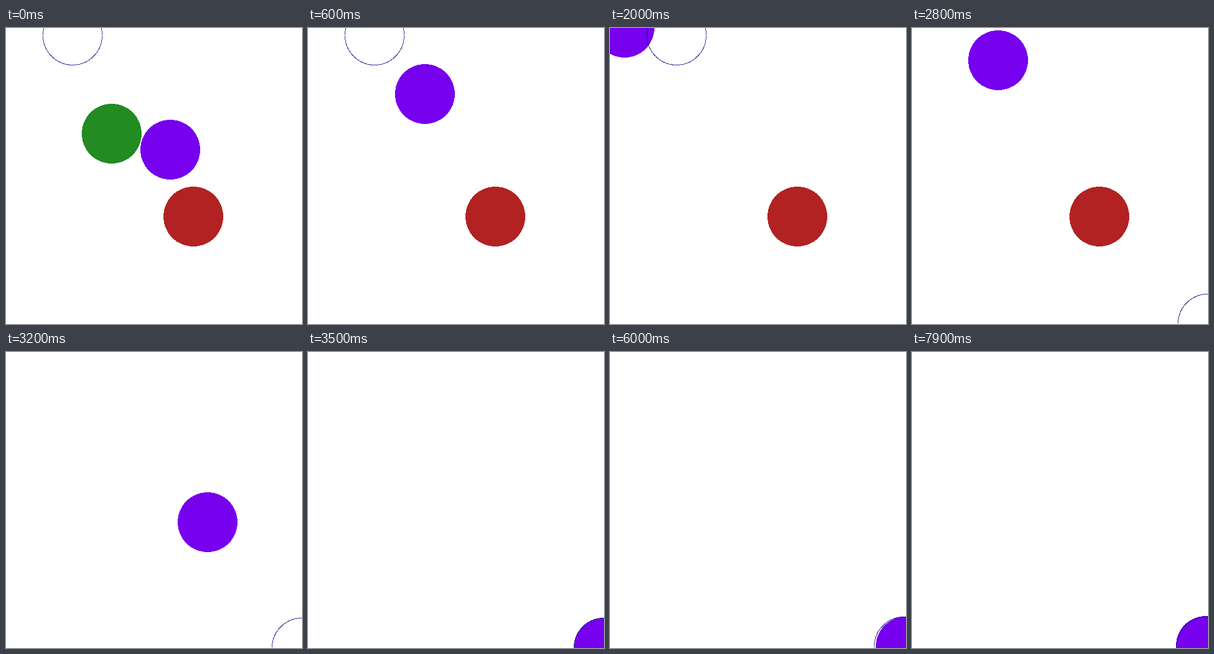
An HTML page for the animation above (8000 ms loop, 500 by 500 pixels).

```html
<!DOCTYPE html>
<html>
<head>
<meta charset="utf-8">
<style>
  html, body { margin: 0; width: 100%; height: 100%; overflow: hidden; background: #fff; }
  svg { display: block; width: 500px; height: 500px; shape-rendering: crispEdges; }
</style>
</head>
<body>
<svg viewBox="0 0 500 500">
  <circle id="green" cx="178.5" cy="178.5" r="50.5" fill="#228b22"/>
  <circle id="red" cx="316.5" cy="318.5" r="50.5" fill="#b22222"/>
  <circle id="chaser" r="50.5" fill="#7700ee"/>
  <circle id="goal" r="50" fill="none" stroke="#000080" stroke-opacity="0.8"
    stroke-dasharray="156.08 1" stroke-dashoffset="-0.5"/>
</svg>
<script>
const STEP = 100, STEPS = 80, SUBSTEPS = 20;
const PULL = 0.0333, DRAG = 0.06;
const CORNER = 499, LANDED = 36, DRIFT = 56;
const [green, red, chaser, goal] = ['green', 'red', 'chaser', 'goal'].map(id => document.getElementById(id));

const clamp = p => Math.max(-1, Math.min(CORNER, p));

// Spring chase along one axis; the pull switches to the corner at step `turn`
function chase(from, aim, turn) {
  const trail = [], dt = 1 / SUBSTEPS;
  let p = from, v = 0;
  for (let i = 0; i <= LANDED * SUBSTEPS; i++) {
    const s = i * dt;
    if (i % SUBSTEPS === 0) trail.push(p);
    v += (PULL * ((s < turn ? aim : CORNER) - p) - DRAG * v) * dt;
    p = clamp(p + v * dt);
  }
  return trail;
}

// Fading oscillation after landing in the corner
function wobble(s, peak, size, fade) {
  const t = s - peak;
  return size * Math.exp(-fade * t) * Math.cos(2 * Math.PI * t / 26);
}

const trailX = chase(277, 112, 26.2);
const trailY = chase(205, 12, 25);

function chaserAt(s) {
  if (s < LANDED) return [trailX[s], trailY[s]];
  return [
    clamp(496 + wobble(s, 46, -6, 0.027)),
    s < DRIFT ? CORNER : 495 + wobble(s, DRIFT, 4, 0.05)
  ];
}

function goalAt(s) {
  if (s < 25) return [112, 12];
  if (s <= LANDED) return [CORNER, CORNER];
  return [496, s < DRIFT ? CORNER : 497];
}

// First step at which the chaser touches a ball
function eatenAt(x, y) {
  return trailX.findIndex((px, s) => Math.hypot(px - x, trailY[s] - y) < 100);
}

const greenEnd = eatenAt(178, 178), redEnd = eatenAt(316, 318);

function place(ball, [x, y]) {
  ball.setAttribute('cx', Math.round(x) + 0.5);
  ball.setAttribute('cy', Math.round(y) + 0.5);
}

function show(ball, on) {
  ball.style.display = on ? '' : 'none';
}

function draw(now) {
  const s = Math.floor(now / STEP) % STEPS;
  place(chaser, chaserAt(s));
  place(goal, goalAt(s));
  show(green, s < greenEnd);
  show(red, s < redEnd);
}

const start = performance.now();
function tick() {
  draw(performance.now() - start);
  requestAnimationFrame(tick);
}
tick();
</script>
</body>
</html>
```
